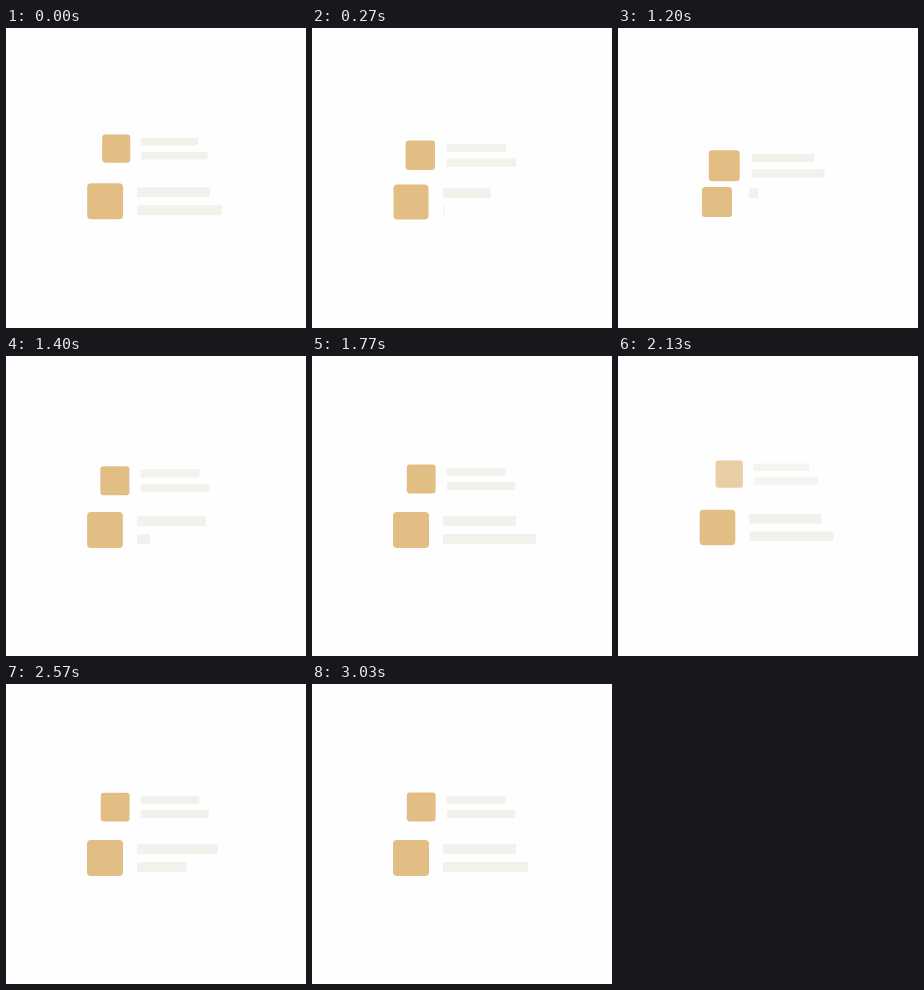
An HTML page with a canvas that plays this animation: 300x300 px, repeating every 3.13 s.

```html
<!DOCTYPE html>
<html>
<head>
<meta charset="utf-8">
<style>
html, body { margin: 0; width: 100%; height: 100%; overflow: hidden; background: #fefefe; }
canvas { display: block; width: 300px; height: 300px; }
</style>
</head>
<body>
<canvas id="stage"></canvas>
<script>
const LOOP = 3130, CYCLE = 1060, FPS = 0.03;
const TILE = '#e2be85', BAR = '#f2f1eb', PAPER = '#fefefe';
const LOW = 174, HIGH = 123, SMALL = 0.8;
const LEAD = 28;   // the upper row starts leaving this long before the shift shows

const canvas = document.getElementById('stage');
const ctx = canvas.getContext('2d');
const dpr = window.devicePixelRatio || 1;
canvas.width = canvas.height = 300 * dpr;

const clamp = v => Math.min(1, Math.max(0, v));

function bezier(x1, y1, x2, y2) {
  const at = (a, b, s) => 3 * a * s * (1 - s) ** 2 + 3 * b * s * s * (1 - s) + s ** 3;
  return x => {
    if (x <= 0) return 0;
    if (x >= 1) return 1;
    let lo = 0, hi = 1;
    for (let i = 0; i < 30; i++) {
      const mid = (lo + hi) / 2;
      if (at(x1, x2, mid) < x) lo = mid; else hi = mid;
    }
    return at(y1, y2, lo);
  };
}
const glide = bezier(0.2, 0, 0, 1);
const inOut = bezier(0.42, 0, 0.58, 1);

// Grows past full length, then settles back
function stretch(t, start, rise) {
  const peak = 1.105, fall = 260;
  const u = t - start;
  return u < rise
    ? peak * inOut(clamp(u / rise))
    : peak - (peak - 1) * inOut(clamp((u - rise) / fall));
}

function box(x, y, w, h, r, color) {
  if (w <= 0 || h <= 0) return;
  ctx.fillStyle = color;
  ctx.beginPath();
  ctx.roundRect(x, y, w, h, Math.min(r, w / 2));
  ctx.fill();
}

function row(y, scale, tile = 1, first = 1, second = 1, alpha = 1) {
  ctx.save();
  ctx.globalAlpha = alpha;
  ctx.translate(150, y);
  ctx.scale(scale, scale);
  const side = 36 * tile;
  box(-51 - side / 2, -side / 2, side, side, 4 * tile, TILE);
  box(-19, -14, 73 * first, 10, 1, BAR);
  box(-19, 4, 85 * second, 10, 1, BAR);
  ctx.restore();
}

function draw(time) {
  const t = Math.floor((time + 7) * FPS) / FPS;
  const turn = Math.floor((t + LEAD) / CYCLE);
  const p = t - turn * CYCLE;

  ctx.setTransform(dpr, 0, 0, dpr, 0, 0);
  ctx.fillStyle = PAPER;
  ctx.fillRect(0, 0, 300, 300);

  const moved = glide(clamp((p + 18) / 500));
  const grown = 1 - (1 - moved) ** 1.45;
  row(LOW, 1, grown, stretch(p, 46, 400), stretch(p, 230, 420));

  const gone = p + LEAD;
  if (gone < 75) {
    const k = (gone / LEAD) ** 1.8;
    row(HIGH - 2.4 * k, SMALL - 0.02 * k, 1, 1, 1, clamp((75 - gone) / 45));
  }
  row(LOW + (HIGH - LOW) * moved, 1 + (SMALL - 1) * moved);
}

const begin = performance.now();
function tick() {
  draw((performance.now() - begin) % LOOP);
  requestAnimationFrame(tick);
}
tick();
</script>
</body>
</html>
```
